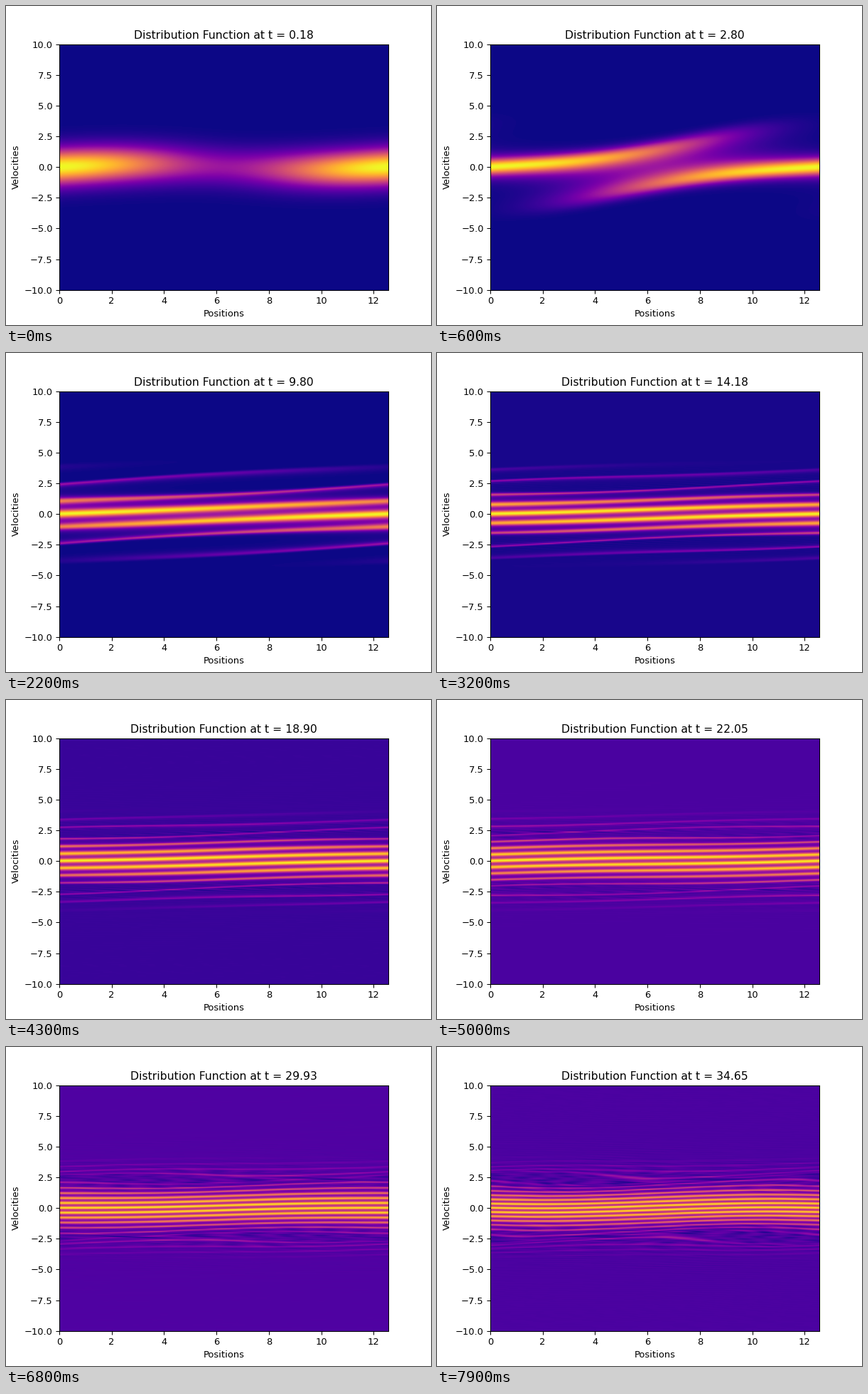
Recreate the animation shown at these times as a matplotlib script. Size 598 px wide and 448 px high, loop 8 s.

```python
import numpy as np
import matplotlib.pyplot as plt
from matplotlib.animation import FuncAnimation

# Strong Landau damping: 1D Vlasov-Poisson, split spectral shifts
LENGTH, V_MAX = 4 * np.pi, 10
NX, NV = 256, 256
DT, STEPS = 0.175, 200
FRAMES, INTERVAL = 80, 100

x = np.arange(NX) * LENGTH / NX
v = -V_MAX + np.arange(NV) * 2 * V_MAX / NV
dv = v[1] - v[0]
kx = 2 * np.pi * np.fft.rfftfreq(NX, LENGTH / NX)
kv = 2 * np.pi * np.fft.rfftfreq(NV, dv)
half_drift = np.exp(-0.5j * DT * np.outer(v, kx))


def drift(f):
    return np.fft.irfft(np.fft.rfft(f, axis=1) * half_drift, NX, axis=1)


def kick(f):
    rho_hat = np.fft.rfft(1 - f.sum(axis=0) * dv)
    e_hat = np.zeros_like(rho_hat)
    e_hat[1:] = rho_hat[1:] / (1j * kx[1:])
    field = np.fft.irfft(e_hat, NX)
    phase = np.exp(1j * DT * np.outer(kv, field))
    return np.fft.irfft(np.fft.rfft(f, axis=0) * phase, NV, axis=0)


def simulate():
    f = np.outer(np.exp(-v**2 / 2) / np.sqrt(2 * np.pi),
                 1 + 0.5 * np.cos(2 * np.pi * x / LENGTH))
    states = [f]
    for _ in range(STEPS):
        f = drift(kick(drift(f)))
        states.append(f)
    return states


states = simulate()
times = np.concatenate([[0], np.cumsum(np.full(STEPS, DT))])

DPI = 93.4375
plt.rcParams["font.family"] = "DejaVu Sans"
fig, ax = plt.subplots(figsize=((598 + 1e-6) / DPI, (448 + 1e-6) / DPI), dpi=DPI)
image = ax.imshow(states[1], origin="lower", aspect="auto", cmap="plasma",
                  extent=[0, LENGTH, -V_MAX, V_MAX], interpolation="bilinear")
ax.set_xlabel("Positions")
ax.set_ylabel("Velocities")
title = ax.set_title("")


def update(frame):
    step = 1 + 5 * frame // 2
    image.set_data(states[step])
    image.autoscale()
    title.set_text(f"Distribution Function at t = {np.round(times[step], 2):.2f}")
    return image, title


anim = FuncAnimation(fig, update, frames=FRAMES, interval=INTERVAL, repeat=True)
plt.show()
```
